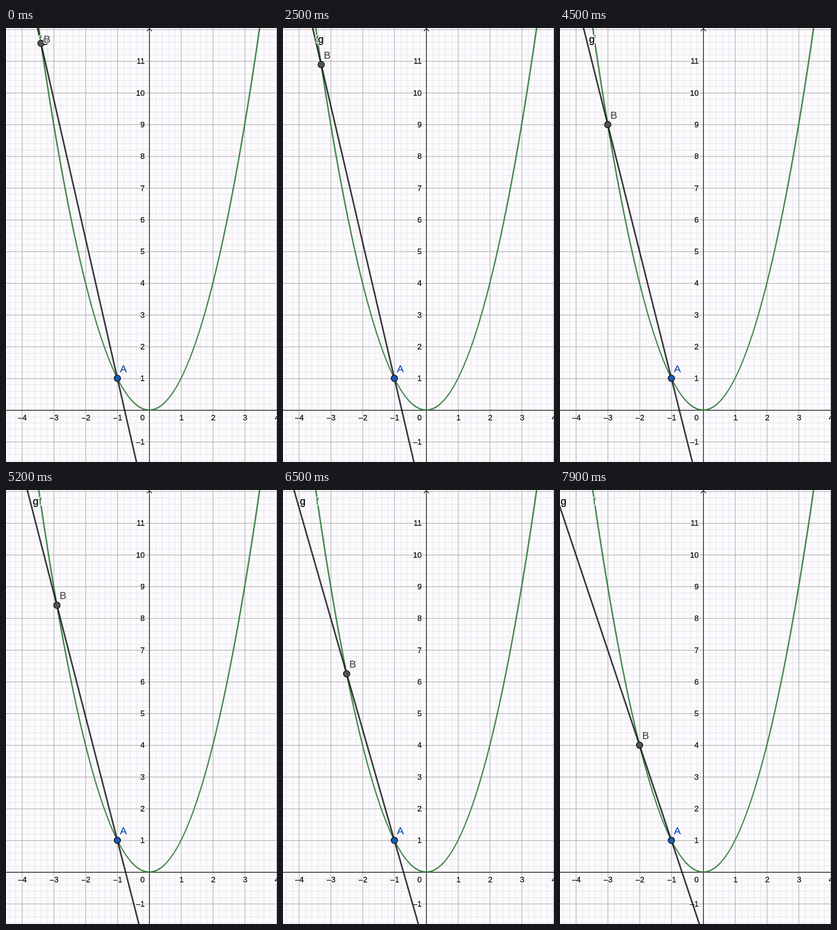
These frames come from a looping animation (591x948 px, 8000 ms). An HTML page:

```html
<!DOCTYPE html>
<html lang="en">
<head>
<meta charset="utf-8">
<title>Secant of a parabola</title>
<style>
  html, body { margin: 0; width: 100%; height: 100%; overflow: hidden; background: #fcfafd; }
  svg { display: block; width: 100%; height: 100%; }
  text { font-family: "Liberation Sans", Arial, sans-serif; stroke-linejoin: round; }
  .tick { font-size: 17.2px; }
  .name { font-size: 22.4px; }
  .halo { stroke: #fcfafd; stroke-width: 4px; }
  .ink { stroke: currentColor; stroke-width: 0.4px; fill: currentColor; }
  .dot { stroke: #111; stroke-width: 1.6px; }
  path { fill: none; }
</style>
</head>
<body>
<svg id="stage" viewBox="0 0 591 948"></svg>
<script>
const W = 591, H = 948, LOOP = 8000;
const UX = 69.4, UY = 69.3, OX = 312.3, OY = 834.6;
const SNAP = 0.4; // grid and axes sit slightly right of and below the curve's origin
const stage = document.getElementById("stage");
const px = x => OX + x * UX;
const py = y => OY - y * UY;

function add(tag, attrs, parent = stage) {
  const el = document.createElementNS("http://www.w3.org/2000/svg", tag);
  for (const k in attrs) el.setAttribute(k, attrs[k]);
  return parent.appendChild(el);
}

function place(el, x, y) {
  el.setAttribute("transform", `translate(${x} ${y})`);
}

// Text with a background halo and slightly heavy strokes
function label(text, kind, color, x, y, anchor = "start") {
  const g = add("g", { class: kind, color, "text-anchor": anchor });
  for (const layer of ["halo", "ink"]) add("text", { class: layer }, g).textContent = text;
  place(g, x, y);
  return g;
}

function drawGrid(major) {
  let d = "";
  for (let i = -22; i <= 60; i++) {
    if ((i % 5 === 0) !== major) continue;
    const x = px(i / 5) + SNAP, y = py(i / 5) + SNAP;
    if (x >= 0 && x <= W) d += `M${x} 0V${H}`;
    if (y >= 0 && y <= H) d += `M0 ${y}H${W}`;
  }
  add("path", { d, stroke: major ? "#b5b3b6" : "#e3e1e5", "stroke-width": major ? 1.5 : 1 });
}

function tick(n, x, y, anchor) {
  label(n < 0 ? "\u2013" + -n : n, "tick", "#161616", x, y, anchor);
}

function drawAxes() {
  const x = OX + SNAP, y = OY + SNAP;
  add("path", {
    d: `M0 ${y}H${W}M${x} ${H}V1M${x - 5.5} 7L${x} 1L${x + 5.5} 7`,
    stroke: "#151515", "stroke-width": 1.5
  });
  for (let n = -4; n <= 4; n++) if (n) tick(n, px(n) + 1, 857.4, "middle");
  tick(0, 302.6, 857.4, "end");
  for (let n = -1; n <= 11; n++) if (n) tick(n, 302.6, py(n) + 6, "end");
}

function drawParabola() {
  // A quadratic Bezier reproduces y = x² exactly
  const r = 3.6, top = py(r * r);
  add("path", {
    d: `M${px(-r)} ${top}Q${OX} ${py(-r * r)} ${px(r)} ${top}`,
    stroke: "#2f7a35", "stroke-opacity": 0.87, "stroke-width": 3.3
  });
}

function makePoint(name, fill, color) {
  const dot = add("circle", { r: 7, class: "dot", fill });
  const tag = label(name, "name", color, 0, 0);
  return x => {
    const cx = px(x), cy = py(x * x);
    place(dot, cx, cy);
    place(tag, cx + 5.7, Math.max(32.2, cy - 13.3));
  };
}

drawGrid(false);
drawGrid(true);
drawAxes();
drawParabola();
const secant = add("path", { stroke: "#0c090d", "stroke-opacity": 0.8, "stroke-width": 3.4 });
label("f", "name", "#38823e", 71.8, 32);
const nameG = label("g", "name", "#050505", 0, 32);
const moveA = makePoint("A", "#1659b3", "#1450b0");
const moveB = makePoint("B", "#545255", "#545255");
moveA(-1);

// Times at which B advances by 0.1 along the x axis
const steps = [1600, 2800, 3500, 4300, 4800, 5400, 5800, 6200, 6500, 6600, 6700, 6900, 7500, 7700];

function render(t) {
  const b = (-34 + steps.filter(s => s <= t).length) / 10;
  const slope = b - 1;
  const lineX = y => px(-1 + ((OY - y) / UY - 1) / slope);
  secant.setAttribute("d", `M${lineX(-10)} -10L${lineX(H + 10)} ${H + 10}`);
  moveB(b);
  place(nameG, Math.max(0.5, lineX(26) + 5.5), 32);
}

const start = performance.now();
function frame() {
  render((performance.now() - start) % LOOP);
  requestAnimationFrame(frame);
}
frame();
</script>
</body>
</html>
```
